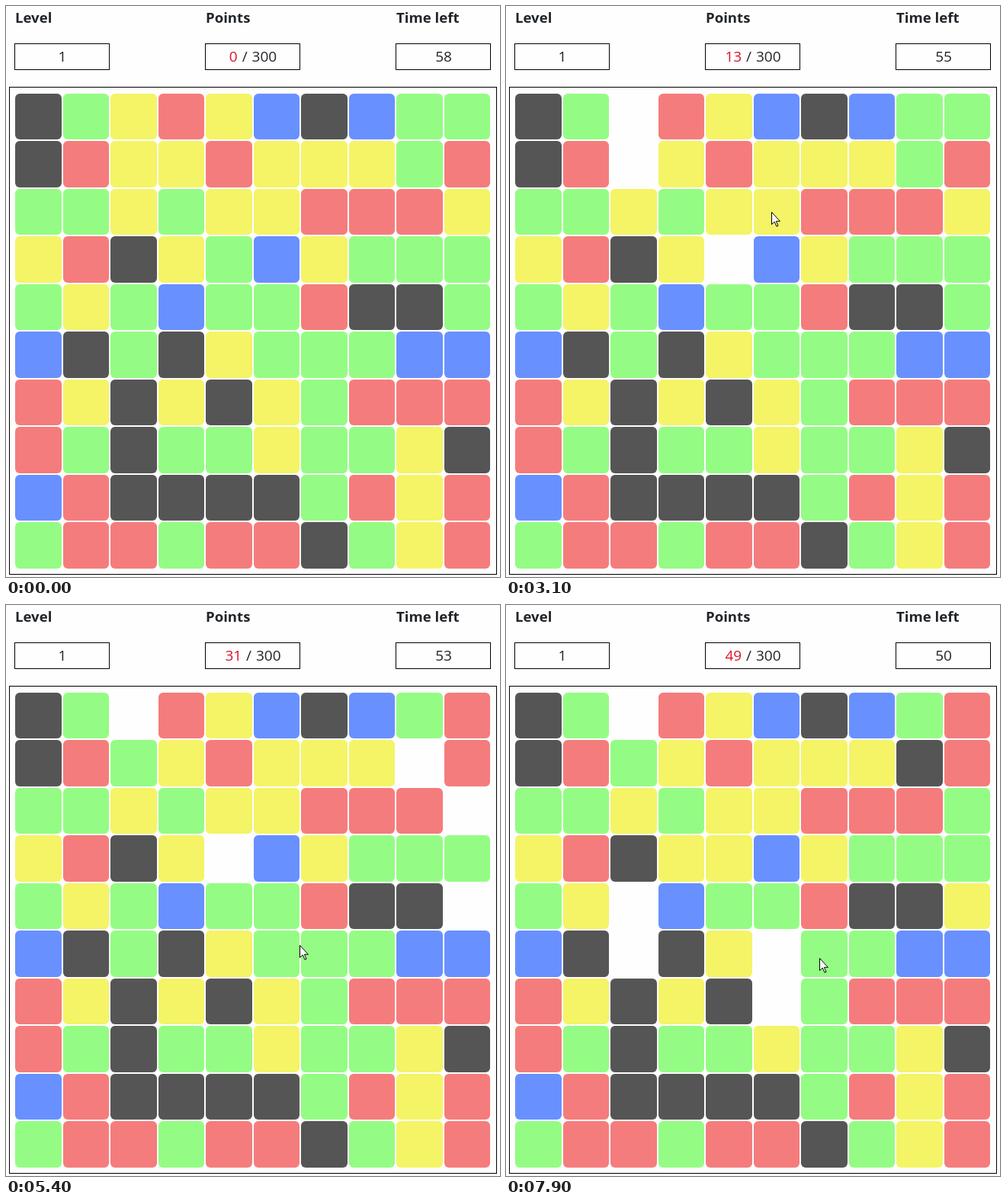
Write an HTML page that moves like this. It is 648 px wide and 749 px high and loops after 8000 ms.

```html
<!DOCTYPE html>
<html lang="en">
<head>
<meta charset="utf-8">
<title>Tile game</title>
<style>
  html, body { margin: 0; width: 100%; height: 100%; overflow: hidden; background: #fefefe; }
  svg { display: block; }
  text { font: 19px "Open Sans", "Noto Sans", sans-serif; fill: #212529; }
  .label { font-size: 18.6px; font-weight: 700; }
  .value { text-anchor: middle; word-spacing: 1px; }
  .frame { fill: none; stroke: #000; }
  #score { fill: #d8142c; }
</style>
</head>
<body>
<svg id="stage" width="648" height="749" viewBox="0 0 648 749">
  <text class="label" x="12" y="22">Level</text>
  <text class="label" x="262" y="22">Points</text>
  <text class="label" x="512" y="22">Time left</text>
  <rect class="frame" x="11.5" y="49.5" width="124" height="34"/>
  <rect class="frame" x="261.5" y="49.5" width="124" height="34"/>
  <rect class="frame" x="511.5" y="49.5" width="124" height="34"/>
  <text class="value" x="74" y="73">1</text>
  <text class="value" x="324" y="73"><tspan id="score">0</tspan> / 300</text>
  <text class="value" x="574" y="73" id="clock">58</text>
  <rect class="frame" x="4.5" y="106.5" width="639" height="639"/>
  <g id="board"></g>
  <path id="cursor" fill="#fff" stroke="#000" stroke-linejoin="round"
        d="M.5 .5v16l3.7-3.5 2.8 6.2 2-1-2.6-5.9h5z"/>
</svg>
<script>
const LOOP = 8000, STEP = 100, SIZE = 10, PITCH = 62.5, LEFT = 12, TOP = 114.6;
const COLORS = { k: '#555', g: '#94fc84', y: '#f4f466', r: '#f57c7c', b: '#6890ff' };
const POINTS = { y: 3, g: 4 };
const START =
  'kgyrybkbgg' + 'kryyryyygr' + 'ggygyyrrry' + 'yrkygbyggg' + 'gygbggrkkg' +
  'bkgkygggbb' + 'rykykygrrr' + 'rgkggyggyk' + 'brkkkkgryr' + 'grrgrrkgyr';

// Tiles that grow back at each second: row, column, colour
const REFILLS = { 3: '22y', 4: '12g', 5: '16y 09r', 6: '49y', 7: '18k 29g 34y', 8: '75y' };

// Pointer stops: time, x, y; a click removes the tile below
const CLICK = true;
const STOPS = [
  [500, 150, 128], [700, 160, 150, CLICK], [1200, 170, 205, CLICK], [1700, 184, 275, CLICK],
  [2100, 185, 276], [2500, 276, 315], [3000, 282, 318, CLICK], [3100, 348, 270],
  [3900, 418, 205, CLICK], [4200, 540, 200, CLICK], [4500, 594, 155, CLICK],
  [4600, 597, 270, CLICK], [4800, 597, 307], [5100, 600, 395, CLICK], [5600, 241, 480],
  [6000, 165, 455, CLICK], [6200, 171, 425], [6400, 172, 400, CLICK], [6900, 350, 468, CLICK],
  [7000, 356, 470], [7200, 352, 566], [7600, 352, 566, CLICK], [7700, 360, 525, CLICK],
  [7900, 411, 463],
];

const $ = id => document.getElementById(id);
const second = t => Math.floor((t + STEP) / 1000);
const cellAt = (x, y) =>
  Math.floor((y - TOP) / PITCH) * SIZE + Math.floor((x - LEFT) / PITCH);

const clicks = STOPS.filter(stop => stop[3])
  .map(([time, x, y]) => ({ time, cell: cellAt(x, y) }));
const refills = Object.entries(REFILLS).flatMap(([s, list]) =>
  list.split(' ').map(item =>
    ({ time: s * 1000 - STEP, cell: +item.slice(0, 2), color: item[2] })));
const events = [...clicks, ...refills].sort((a, b) => a.time - b.time);

const tiles = [...START].map((_, i) => {
  const x = LEFT + PITCH * (i % SIZE), y = TOP + PITCH * Math.floor(i / SIZE);
  const left = Math.round(x), top = Math.round(y);
  const tile = document.createElementNS('http://www.w3.org/2000/svg', 'rect');
  const box = {
    x: left, y: top, rx: 6,
    width: Math.round(x + 60.5) - left,
    height: Math.round(y + 60.5) - top,
  };
  for (const key in box) tile.setAttribute(key, box[key]);
  return $('board').appendChild(tile);
});

function pointerAt(t) {
  const i = STOPS.findLastIndex(stop => stop[0] <= t);
  const [t0, x0, y0] = STOPS[i], [t1, x1, y1] = STOPS[i + 1] || [LOOP, x0, y0];
  const k = (t - t0) / (t1 - t0);
  return [Math.round(x0 + (x1 - x0) * k), Math.round(y0 + (y1 - y0) * k)];
}

function draw(t) {
  const grid = [...START];
  let score = 0;
  for (const { time, cell, color } of events) {
    if (time > t) break;
    if (!color) score += POINTS[grid[cell]];
    grid[cell] = color;
  }
  tiles.forEach((tile, i) => tile.setAttribute('fill', COLORS[grid[i]] || 'none'));
  $('score').textContent = score;
  $('clock').textContent = 58 - second(t);

  const shown = t >= STOPS[0][0];
  $('cursor').style.display = shown ? '' : 'none';
  if (shown) $('cursor').setAttribute('transform', `translate(${pointerAt(t)})`);
}

function loop() {
  draw(Math.floor(performance.now() % LOOP / STEP) * STEP);
  requestAnimationFrame(loop);
}
loop();
</script>
</body>
</html>
```
